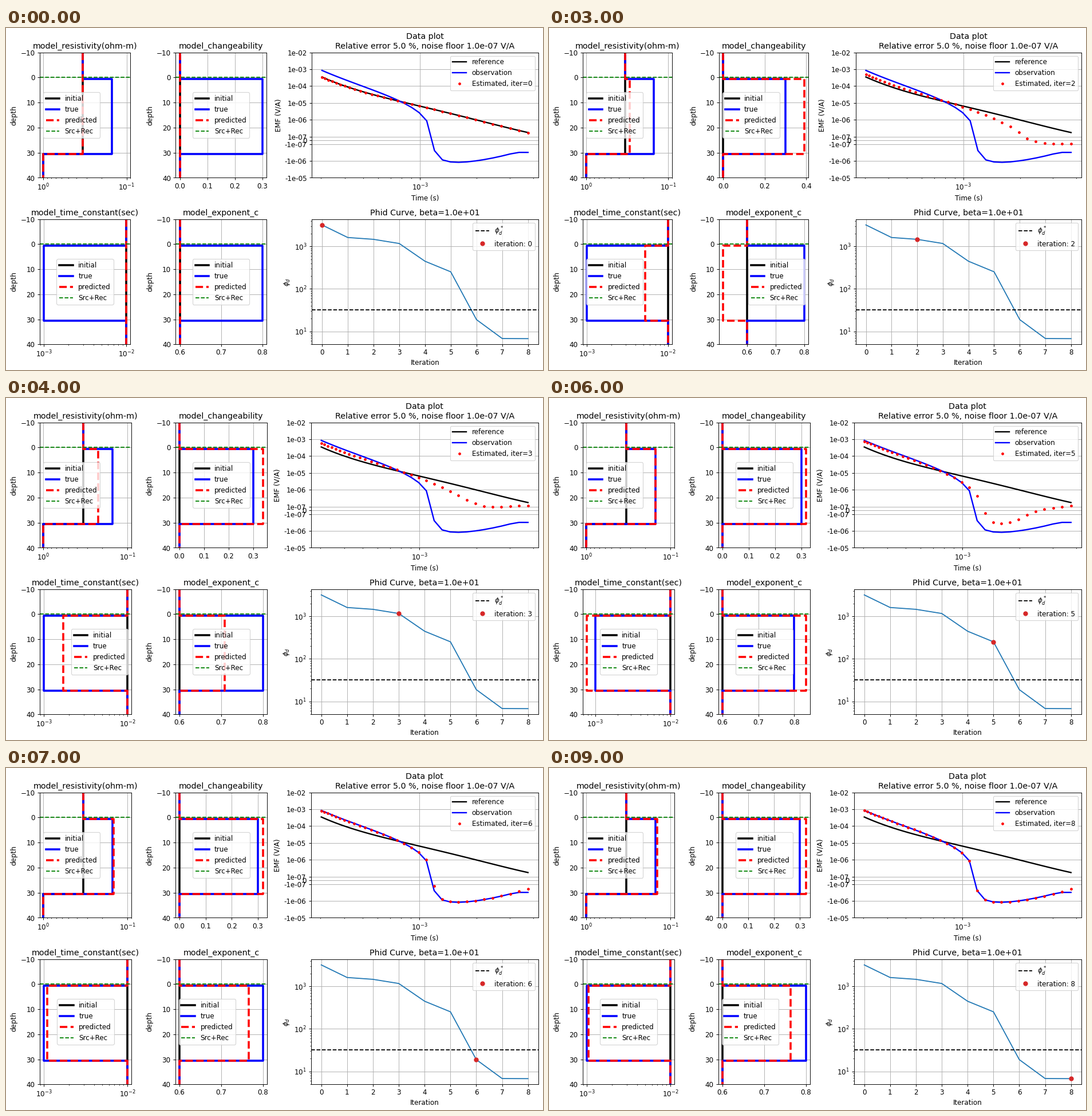
A matplotlib script for the animation above (10 s loop, 938 by 597 pixels).

```python
import numpy as np
import matplotlib.pyplot as plt
from matplotlib.animation import FuncAnimation

W, H, DPI = 938, 597, 85.28
LEFT, RIGHT, GAP = 58.9, 929.8, 76.6
ROWS = [(42.7, 261.5), (333.8, 552.2)]
HALF_LABEL = 9.8

# title, background, value below the layer, true value, log axis
MODELS = [
    ("model_resistivity(ohm-m)", 1 / 3, 1, 0.15, True),
    ("model_changeability", 0, 0, 0.3, False),
    ("model_time_constant(sec)", 1e-2, 1e-2, 1e-3, True),
    ("model_exponent_c", 0.6, 0.6, 0.8, False),
]

# key values over the iterations, linear in between
RESISTIVITY = {0: 1 / 3, 1: 0.397, 2: 0.292, 4: 0.156, 6: 0.146, 8: 0.1445}
CHARGE = {0: 0, 1: 0.422, 2: 0.391, 3: 0.34, 4: 0.207, 5: 0.318, 8: 0.323}
LOG_TAU = {1: -2, 2: -2.278, 4: -3.257, 6: -2.961, 8: -2.979}
EXPONENT = {1: 0.6, 2: 0.518, 4: 0.9, 6: 0.766, 8: 0.7636}
BLEND = {0: 0, 1: 0.25, 2: 0.4, 4: 0.8, 6: 0.95, 8: 1}
IP_LEVEL = {0: -9, 1: -6.08, 2: -6.55, 4: -4.3, 6: -5.15, 8: -5.142}
IP_RATE = {0: 0, 1: 0.2, 2: 0.13, 4: 1.25, 6: 0.423}
TAIL = {2: 0, 4: 2.5e-7, 6: 0}

PHID = [3197, 1617, 1464, 1168, 447, 252, 18.9, 6.79, 6.75]
TARGET = 32

# times in ms, and their logarithm
T = 0.205 + 0.098 * np.exp(0.11566 * np.arange(32))
S = np.log10(T)
START = np.polyval(np.polyfit([-0.519, -0.286, 0.035, 0.299, 0.572],
                              [-3.455, -4.383, -5.28, -6.004, -6.752], 4), S)
FINAL = np.polyval([-4.55, -3.74, -5, -5.285], S)


def at(keys, it):
    return np.interp(it, list(keys), list(keys.values()))


def emf(it, floor=0):
    """Inductive decay minus the polarisation decay."""
    w = at(BLEND, it)
    decay = 10 ** ((1 - w) * START + w * FINAL)
    ip = 10 ** (at(IP_LEVEL, it) - at(IP_RATE, it) * T)
    return decay - np.maximum(ip, floor) + at(TAIL, it)


fig = plt.figure(figsize=((W + 0.001) / DPI, (H + 0.001) / DPI), dpi=DPI,
                 facecolor="white")
model_axes = [fig.add_axes([0, 0, 1, 1], label=m[0]) for m in MODELS]
data_ax = fig.add_axes([0, 0, 1, 1], label="data")
phid_ax = fig.add_axes([0, 0, 1, 1], label="phid")


def place(ax, x0, x1, row):
    top, bottom = ROWS[row]
    ax.set_position([x0 / W, 1 - bottom / H, (x1 - x0) / W,
                     (bottom - top) / H])


def layout(gap):
    """Four columns; the right-hand plots span two. Returns column width."""
    col = (RIGHT - LEFT - 3 * gap) / 4
    for k, ax in enumerate(model_axes):
        x0 = LEFT + (k % 2) * (col + gap)
        place(ax, x0, x0 + col, k // 2)
    for row, ax in enumerate((data_ax, phid_ax)):
        place(ax, LEFT + 2 * (col + gap), RIGHT, row)
    return col


def overhang(ax, width):
    """How far the last tick label sticks out on the right."""
    lo, hi = ax.get_xlim()
    last = max(t for t in ax.get_xticks() if t <= hi)
    return max(0, HALF_LABEL - (hi - last) / (hi - lo) * width)


def draw_model(ax, model, predicted):
    title, back, below, true, log = model
    ax.clear()
    if log:
        ax.set_xscale("log")
    depth = [-10, 0.5, 0.5, 30.5, 30.5, 40]
    for value, style, label in ((back, "k-", "initial"), (true, "b-", "true"),
                                (predicted, "r--", "predicted")):
        ax.plot([back, back, value, value, below, below], depth, style,
                lw=3, label=label)
    ax.axhline(0, color="green", ls="--", lw=1.5, label="Src+Rec")
    if ax is model_axes[0]:
        ax.set_xlim(1.1, 0.09)
    ax.set_ylim(40, -10)
    ax.set_yticks(range(-10, 41, 10))
    ax.set_ylabel("depth")
    ax.set_title(title)
    ax.grid(True)
    ax.legend(loc="best")


def draw_data(it):
    ax = data_ax
    ax.clear()
    ax.set_xscale("log")
    ax.set_yscale("symlog", linthresh=1e-7, linscale=0.2)
    t = T / 1000
    ax.plot(t, emf(0), "k-", lw=2, label="reference")
    ax.plot(t, emf(8, floor=3.1e-7), "b-", lw=2, label="observation")
    ax.plot(t, emf(it), "r.", label=f"Estimated, iter={it}")
    ticks = [-10.0 ** k for k in (-5, -6, -7)] + [0]
    ticks += [10.0 ** k for k in range(-7, -1)]
    ax.set_yticks(ticks, [f"{v:.0e}" if v else "0" for v in ticks])
    ax.set_ylim(-1e-5, 1e-2)
    ax.set_xlabel("Time (s)")
    ax.set_ylabel("EMF (V/A)")
    ax.set_title("Data plot\nRelative error 5.0 %, noise floor 1.0e-07 V/A")
    ax.grid(True)
    ax.legend(loc="upper right")


def draw_phid(it):
    ax = phid_ax
    ax.clear()
    ax.set_yscale("log")
    ax.plot(range(9), PHID)
    ax.axhline(TARGET, color="k", ls="--", label=r"$\phi_d^*$")
    ax.plot([it], [PHID[it]], "o", color="C3", label=f"iteration: {it}")
    ax.set_xticks(range(9))
    ax.set_xlabel("Iteration")
    ax.set_ylabel(r"$\phi_d$")
    ax.set_title("Phid Curve, beta=1.0e+01")
    ax.grid(True)
    ax.legend(loc="upper right")


def update(i):
    it = max(0, i - 1)  # the starting model is held twice as long
    width = layout(GAP)
    values = (at(RESISTIVITY, it), at(CHARGE, it), 10 ** at(LOG_TAU, it),
              at(EXPONENT, it))
    for ax, model, value in zip(model_axes, MODELS, values):
        draw_model(ax, model, value)
    draw_data(it)
    draw_phid(it)
    layout(GAP + overhang(model_axes[1], width))
    return []


anim = FuncAnimation(fig, update, frames=10, interval=1000, repeat=True,
                     repeat_delay=0, blit=False)
plt.show()
```
